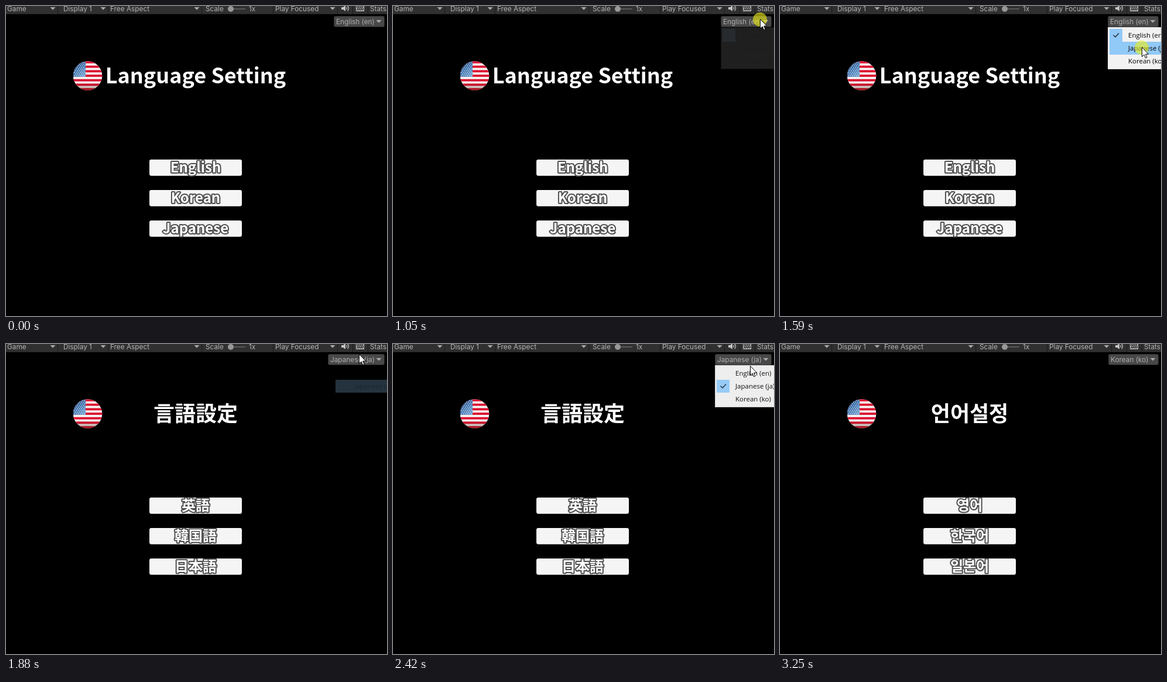
An HTML page with a canvas for the animation above (4130 ms loop, 651 by 529 pixels).

```html
<!DOCTYPE html>
<html lang="en">
<head>
<meta charset="utf-8">
<title>Language setting</title>
<style>
  html, body { margin: 0; width: 100%; height: 100%; overflow: hidden; background: #000; }
  canvas { display: block; }
</style>
</head>
<body>
<canvas id="stage" width="651" height="529"></canvas>
<script>
const ctx = document.getElementById('stage').getContext('2d');
const LOOP = 4130;
const UI_FONT = '11.8px Inter, sans-serif';
const MENU_FONT = '11.5px "Open Sans", "Noto Sans", sans-serif';

const LANGS = {
  en: { name: 'English (en)', dropX: 560, row: 0, cjk: 'KR',
        title: 'Language Setting', buttons: ['English', 'Korean', 'Japanese'] },
  ja: { name: 'Japanese (ja)', dropX: 550, row: 1, cjk: 'JP',
        title: '言語設定', buttons: ['英語', '韓国語', '日本語'] },
  ko: { name: 'Korean (ko)', dropX: 561, row: 2, cjk: 'KR',
        title: '언어설정', buttons: ['영어', '한국어', '일본어'] },
};
const ITEMS = [LANGS.en, LANGS.ja, LANGS.ko];

// The screen refreshes only in short bursts: [first, last, count].
const BURSTS = [[720, 850, 3], [1050, 1320, 5], [1590, 1950, 6], [2090, 2160, 2],
                [2280, 2560, 5], [2630, 2770, 3], [2910, 3250, 6]];
const TICKS = [0];
for (const [first, last, count] of BURSTS)
  for (let i = 0; i < count; i++)
    TICKS.push(Math.floor((first + (last - first) * i / (count - 1)) / 10) * 10);

const POINTER = [[720, 645, 28], [780, 628, 22], [1050, 627, 22], [1110, 626, 28],
  [1180, 622, 45], [1320, 618, 70], [1660, 618, 70], [1870, 603, 17], [1950, 606, 22],
  [2280, 608, 23], [2420, 610, 37], [2560, 610, 66], [2770, 610, 89], [2970, 610, 89],
  [3180, 646, 42], [3250, 660, 30]];
const CLICKS = [[1050, 1110], [1590, 1730], [2090, 2280], [2910, 3040]];
const MENUS = [{ lang: LANGS.en, open: 1040, pick: 1660, choice: 1 },
               { lang: LANGS.ja, open: 2290, pick: 2970, choice: 2 }];
const FADE_IN = 140, FADE_OUT = 280;

function rect(x, y, w, h, color) {
  ctx.fillStyle = color;
  ctx.fillRect(x, y, w, h);
}

function roundRect(x, y, w, h, r, color) {
  ctx.fillStyle = color;
  ctx.beginPath();
  ctx.roundRect(x, y, w, h, r);
  ctx.fill();
}

function disc(x, y, r, color) {
  ctx.fillStyle = color;
  ctx.beginPath();
  ctx.arc(x, y, r, 0, Math.PI * 2);
  ctx.fill();
}

function polygon(x, y, points, color) {
  ctx.fillStyle = color;
  ctx.beginPath();
  points.forEach(([px, py]) => ctx.lineTo(x + px, y + py));
  ctx.closePath();
  ctx.fill();
}

function text(str, x, y, font, color, align = 'left') {
  ctx.font = font;
  ctx.textAlign = align;
  ctx.fillStyle = color;
  ctx.fillText(str, x, y);
}

const arrow = (x, y, color) => polygon(x, y, [[-4.5, 0], [4.5, 0], [0, 4.7]], color);

function drawToolbar() {
  rect(0, 0, 651, 14, '#303030');
  rect(0, 13, 651, 1, '#292929');
  for (const x of [88, 174, 334, 456, 566, 592, 618]) rect(x, 0, 1, 14, '#1b1b1b');
  const labels = [['Game', 2], ['Display 1', 98], ['Free Aspect', 178], ['Scale', 341],
                  ['1x', 415], ['Play Focused', 460], ['Stats', 622]];
  for (const [label, x] of labels) text(label, x, 9, UI_FONT, '#b4b4b4');
  for (const x of [80, 166, 326, 558]) arrow(x, 2, '#a8a8a8');
  rect(384, 4, 25, 2, '#5a5a5a');
  disc(384, 5, 5, '#989898');

  polygon(573, 0, [[0, 2], [3, 2], [7, -1], [7, 9], [3, 6], [0, 6]], '#c4c4c4');
  ctx.strokeStyle = '#c4c4c4';
  ctx.lineWidth = 1.2;
  for (const r of [2.5, 5.5]) {
    ctx.beginPath();
    ctx.arc(580, 4, r, -0.9, 0.9);
    ctx.stroke();
  }
  ctx.lineWidth = 1;
  ctx.strokeRect(598.5, -0.5, 13, 9);
  for (let row = 0; row < 3; row++)
    for (let col = 0; col < 4; col++) rect(600 + col * 3 - row % 2, 1 + row * 3, 2, 1.5, '#c4c4c4');
}

function drawFlag() {
  const x = 115, y = 94, size = 50, stripe = size / 13;
  ctx.save();
  ctx.beginPath();
  ctx.arc(x + 24.5, y + 25, 24.8, 0, Math.PI * 2);
  ctx.clip();
  rect(x, y, size, size, '#f7f4f4');
  for (let i = 0; i < 13; i += 2) rect(x, y + i * stripe, size, stripe, '#dc1230');
  const blue = ctx.createLinearGradient(x, y, x + 21, y + 27);
  blue.addColorStop(0, '#1b3a6c');
  blue.addColorStop(0.5, '#4477b0');
  blue.addColorStop(1, '#79a9d8');
  rect(x, y, 21, stripe * 7, blue);
  for (let row = 0; row < 9; row++)
    for (let col = 0; col < 6 - row % 2; col++)
      disc(x + 2 + col * 3.5 + row % 2 * 1.75, y + 2.5 + row * 2.8, 0.75, '#e4edf6');
  const shade = ctx.createLinearGradient(0, y + 36, 0, y + size);
  shade.addColorStop(0, 'rgba(60,20,0,0)');
  shade.addColorStop(1, 'rgba(60,20,0,.4)');
  rect(x, y + 36, size, 14, shade);
  ctx.restore();
}

function drawPage(lang) {
  const family = `"Noto Sans CJK ${lang.cjk}", "Noto Sans CJK JP", "Noto Sans CJK", sans-serif`;
  text(lang.title, 324, 132, `bold 36px ${family}`, '#fff', 'center');
  lang.buttons.forEach((label, i) => {
    const y = 262 + i * 52;
    roundRect(245, y, 158, 28, 3.5, '#b8b8b8');
    roundRect(245, y, 158, 27, 3.5, '#f5f5f5');
    ctx.font = `bold 24px ${family}`;
    ctx.textAlign = 'center';
    ctx.lineJoin = 'round';
    ctx.lineWidth = 4;
    ctx.strokeStyle = '#505050';
    ctx.strokeText(label, 324, y + 22);
    text(label, 324, y + 22, ctx.font, '#fff', 'center');
  });
}

function drawDropdown({ name, dropX }) {
  roundRect(dropX, 17, 647 - dropX, 19, 3, '#2c2c2c');
  roundRect(dropX + 1, 18, 645 - dropX, 17, 2.5, '#484848');
  text(name, dropX + 4, 31, UI_FONT, '#aeaeae');
  arrow(637, 24, '#a8a8a8');
}

const rowTop = row => 39 + row * 22;

function drawItem(menuX, row) {
  text(ITEMS[row].name, menuX + 35, rowTop(row) + 15, MENU_FONT, '#000');
}

function drawMenu(lang, pointerY) {
  const x = lang.dropX;
  rect(x, 36, 110, 72, '#d6d6d6');
  rect(x + 1, 37, 110, 70, '#f2f2f2');
  ITEMS.forEach((item, row) => {
    const y = rowTop(row);
    const hovered = pointerY >= y && pointerY < y + 22;
    if (hovered) rect(x + 3, y, 110, 22, '#91c9f7');
    if (item === lang) {
      rect(x + 3, y, 22, 22, hovered ? '#56b0fa' : '#91c9f7');
      ctx.strokeStyle = '#1c2733';
      ctx.lineWidth = 1.4;
      ctx.beginPath();
      ctx.moveTo(x + 9.5, y + 10.5);
      ctx.lineTo(x + 13, y + 14);
      ctx.lineTo(x + 19, y + 7.5);
      ctx.stroke();
    }
    drawItem(x, row);
  });
}

function drawMenus(time, pointerY) {
  for (const { lang, open, pick, choice } of MENUS) {
    if (time < open) continue;
    if (time < pick) {
      ctx.globalAlpha = Math.min(1, (time - open) / FADE_IN);
      drawMenu(lang, pointerY);
    } else {
      // Only the chosen row lingers and fades after the menu closes.
      ctx.globalAlpha = Math.max(0, 1 - (time - pick) / FADE_OUT);
      rect(lang.dropX + 3, rowTop(choice), 110, 22, '#91c9f7');
      drawItem(lang.dropX, choice);
    }
    ctx.globalAlpha = 1;
  }
}

function pointerAt(time) {
  const next = POINTER.findIndex(key => key[0] > time);
  if (next < 1) return null;
  const [t0, x0, y0] = POINTER[next - 1], [t1, x1, y1] = POINTER[next];
  const k = (time - t0) / (t1 - t0);
  return { x: Math.round(x0 + (x1 - x0) * k), y: Math.round(y0 + (y1 - y0) * k) };
}

function drawPointer({ x, y }, pressed) {
  if (pressed) disc(x, y + 1, 12, 'rgba(240,240,20,.6)');
  polygon(x + 0.5, y + 0.5,
    [[0, 0], [0, 16], [3.6, 12.6], [6.2, 18.3], [8.6, 17.2], [6.1, 11.7], [11.2, 11.7]], '#fff');
  ctx.strokeStyle = '#000';
  ctx.lineWidth = 1;
  ctx.lineJoin = 'miter';
  ctx.stroke();
}

function draw(now) {
  const elapsed = now % LOOP;
  const time = TICKS.findLast(tick => tick <= elapsed);
  const lang = time >= 3040 ? LANGS.ko : time >= 1730 ? LANGS.ja : LANGS.en;
  const pointer = pointerAt(time);
  rect(0, 0, 651, 529, '#000');
  drawToolbar();
  drawFlag();
  drawPage(lang);
  drawDropdown(lang);
  drawMenus(time, pointer ? pointer.y : -1);
  if (pointer) drawPointer(pointer, CLICKS.some(([from, to]) => time >= from && time < to));
}

let start;
function tick(now) {
  start ??= now;
  draw(now - start);
  requestAnimationFrame(tick);
}
draw(0);
requestAnimationFrame(tick);
</script>
</body>
</html>
```
